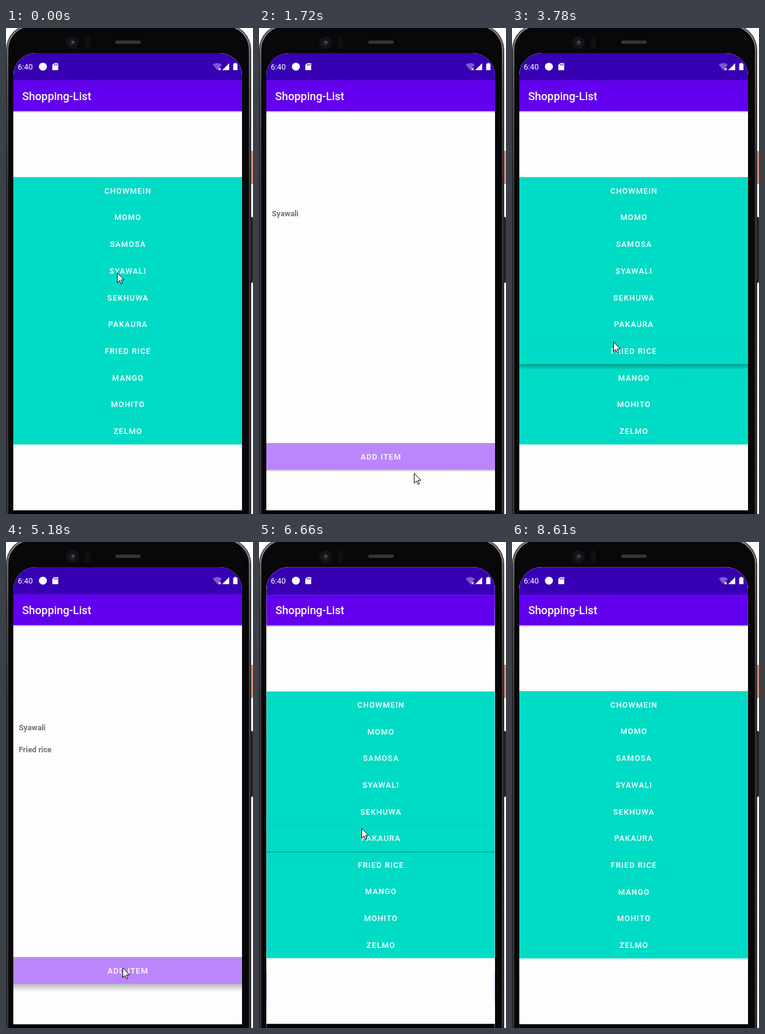
Write an HTML page that moves like this. It is 405 px wide and 795 px high and loops after 9420 ms.

```html
<!DOCTYPE html>
<html lang="en">
<head>
<meta charset="utf-8">
<title>Shopping list</title>
<style>
  html, body { margin: 0; height: 100%; overflow: hidden; background: #fff; }
  svg { display: block; width: 100%; height: 100%; }
  text { font: 500 12.77px Roboto, sans-serif; fill: #fff; }
  .title { font-size: 18.24px; }
  .label { letter-spacing: 1.14px; text-anchor: middle; }
  .item { font-weight: 700; fill: #737373; }
  .clock { font-weight: 400; }
</style>
</head>
<body>
<svg viewBox="0 0 405 795">
  <defs>
    <clipPath id="screen"><rect x="12" y="41" width="375" height="900" rx="37"/></clipPath>
    <linearGradient id="fade" x2="0" y2="1">
      <stop stop-opacity=".3"/><stop offset=".5" stop-opacity=".14"/><stop offset="1" stop-opacity="0"/>
    </linearGradient>
    <linearGradient id="rim" x2="0" y2="1">
      <stop stop-color="#858588"/><stop offset=".12" stop-color="#555558"/><stop offset=".3" stop-color="#3a3a3d"/>
    </linearGradient>
    <g id="bars">
      <path fill="#fdfdfd" d="M12 41H387V789H12Z"/>
      <path d="M12 789H387V833H12Z"/>
      <path fill="#3700b3" d="M12 41H387V86H12Z"/>
      <path fill="#6200ee" d="M12 85.5H387V136H12Z"/>
      <rect x="12" y="136" width="375" height="3" fill="url(#fade)"/>
      <text class="title" x="26.6" y="117.700">Shopping-List</text>
    </g>
  </defs>

  <!-- phone body -->
  <path fill="#d98d78" d="M400 201H405V255H400Z"/>
  <path fill="#262628" d="M399 309H403Q405 309 405 312V414Q405 417 403 417H399Z"/>
  <rect y="-6" width="402" height="900" rx="42" fill="#1c1c1e"/>
  <rect x="2.500" y="-4" width="397" height="900" rx="40" fill="#08080a" stroke="url(#rim)" stroke-width="2.500"/>
  <circle cx="109" cy="24" r="9.500" fill="#131315" stroke="#1c1c1e"/>
  <circle cx="109" cy="24" r="4.500" fill="#27282d"/>
  <circle cx="110" cy="23" r="1.500" fill="#62666e"/>
  <rect x="129" y="14" width="9" height="20" rx="4" fill="#101012"/>
  <rect x="179" y="20.500" width="42" height="5.500" rx="2.500" fill="#343437"/>

  <g clip-path="url(#screen)">
    <rect x="12" y="41" width="375" height="754"/>
    <g id="home">
      <use href="#bars"/>
      <g id="items"></g>
      <rect id="addShadow" x="12" y="722" width="375" fill="url(#fade)"/>
      <path fill="#bb86fc" d="M12 679H387V722.500H12Z"/>
      <text class="label" x="200" y="705.500">ADD ITEM</text>
    </g>
    <g id="menu">
      <use href="#bars"/>
      <path fill="#00dbc6" d="M12 244H387V681.300H12Z"/>
      <g id="press">
        <path d="M12 0H387" stroke="#000" stroke-opacity=".05"/>
        <rect id="pressShadow" x="12" y="43.500" width="375" fill="url(#fade)"/>
      </g>
      <g id="labels"></g>
    </g>
    <!-- status bar -->
    <g fill="#fff">
      <text class="clock" x="19.200" y="68">6:40</text>
      <circle cx="60.500" cy="63.200" r="6.500"/>
      <path d="M79 57.500H85.500V69H76V60.500Z"/>
      <path stroke="#3700b3" d="M79.500 59V61.500M81.500 59V61.500M83.500 59V61.500"/>
      <path opacity=".35" d="M339 60Q346.500 54.500 354 60L346.500 69Z"/>
      <path stroke="#fff" stroke-width="1.200" d="M348.500 65.500L352 69M352 65.500L348.500 69"/>
      <path d="M366 57.500V69H354.500Z"/>
      <path d="M372.500 58.500H374.500V57H377.500V58.500H379.500V69H372.500Z"/>
    </g>
  </g>
  <path id="cursor" fill="#fff" stroke="#000" d="M.5 .5V16.500L4.200 13L6.700 18.500L9 17.500L6.600 12H11.500Z"/>
</svg>
<script>
const LOOP = 9420, STEP = 135, ROW = 43.73;
const $ = id => document.getElementById(id);
const set = (id, attrs) => { for (const k in attrs) $(id).setAttribute(k, attrs[k]); };

const dishes = ['Chowmein', 'Momo', 'Samosa', 'Syawali', 'Sekhuwa', 'Pakaura', 'Fried rice', 'Mango', 'Mohito', 'Zelmo'];

// Each round: press a dish, menu closes, press "add item", menu opens again
const rounds = [
  { row: 3, press: 650, close: 1180, add: 2560, open: 2720, dishAt: [182, 400], via: [254, 728], addAt: [191, 689] },
  { row: 6, press: 3780, close: 4150, add: 5180, open: 5550, dishAt: [166, 513], addAt: [191, 696] },
  { row: 5, press: 6360, close: 6660, add: 7910, open: 8340, dishAt: [168, 468], addAt: [181, 706] }
];
const events = [0, ...rounds.flatMap(r => [r.press, r.close, r.add, r.open])];

// Pointer key points: time and place
const path = rounds.flatMap(r => [
  [r.open - LOOP, r.dishAt],
  [r.close + STEP, r.dishAt],
  ...(r.via ? [[r.close + 4 * STEP, r.via]] : []),
  [r.add - 2 * STEP, r.addAt],
  [r.open + STEP, r.addAt]
]);
rounds.slice(1).forEach((r, i) => path.push([rounds[i].open + 4 * STEP, r.dishAt]));
path.sort((a, b) => a[0] - b[0]);
const track = path.filter(([time]) => time > 0);

$('labels').innerHTML = dishes.map((d, i) =>
  `<text class="label" x="200" y="${270.6 + i * ROW}">${d.toUpperCase()}</text>`).join('');
$('items').innerHTML = rounds.map((r, i) =>
  `<text class="item" x="21" y="${308.2 + i * 35.5}">${dishes[r.row]}</text>`).join('');

const clamp = v => Math.max(0, Math.min(1, v));
const fastOut = u => u >= 1 ? 1 : u < 1 / 6 ? .4 * (6 * u) ** 3 : 1 - .6 * Math.exp(-14 * (u - 1 / 6));
const zoom = s => `translate(199.5 437) scale(${s}) translate(-199.5 -437)`;

function pointer(t) {
  const next = track.findIndex(([time]) => time > t);
  if (next < 1) return track.at(next)[1];
  const [[a, from], [b, to]] = track.slice(next - 1, next + 1);
  return from.map((v, i) => Math.round(v + (to[i] - v) * (t - a) / (b - a)));
}

function draw(now) {
  // The screen refreshes in coarse steps counted from the latest event
  const time = now % LOOP;
  const event = events.findLast(e => e <= time);
  const t = event + Math.floor((time - event) / STEP) * STEP;

  const round = rounds.findLast(r => t >= r.press);
  const closed = round && t >= round.close;
  const opening = !closed || t >= round.open;
  const start = !closed ? -LOOP : opening ? round.open : round.close;
  const u = (t - start + 55) / (opening ? 600 : 900);
  const p = start < 0 ? 1 : fastOut(u);
  const shown = start < 0 ? 1 : clamp((u - .09) / .12);

  set('home', { transform: zoom(opening ? 1 + .1 * p : 1.1 - .1 * p) });
  set('menu', {
    transform: zoom(opening ? .85 + .15 * p : 1 - .1 * p),
    opacity: opening ? shown : 1 - shown
  });
  rounds.forEach((r, i) => $('items').children[i].setAttribute('opacity', t >= r.close ? 1 : 0));

  const pressed = round && t < round.add;
  set('press', { opacity: pressed ? 1 : 0, transform: `translate(0 ${244 + (round?.row ?? 0) * ROW})` });
  set('pressShadow', { height: closed ? 3 : 9 });
  const adding = closed && t >= round.add && t < round.open + STEP;
  set('addShadow', { height: adding ? 14 : 4 });

  set('cursor', {
    transform: `translate(${pointer(t)})`,
    opacity: t >= rounds.at(-1).open + 2 * STEP ? 0 : 1
  });
  requestAnimationFrame(draw);
}
requestAnimationFrame(draw);
</script>
</body>
</html>
```
